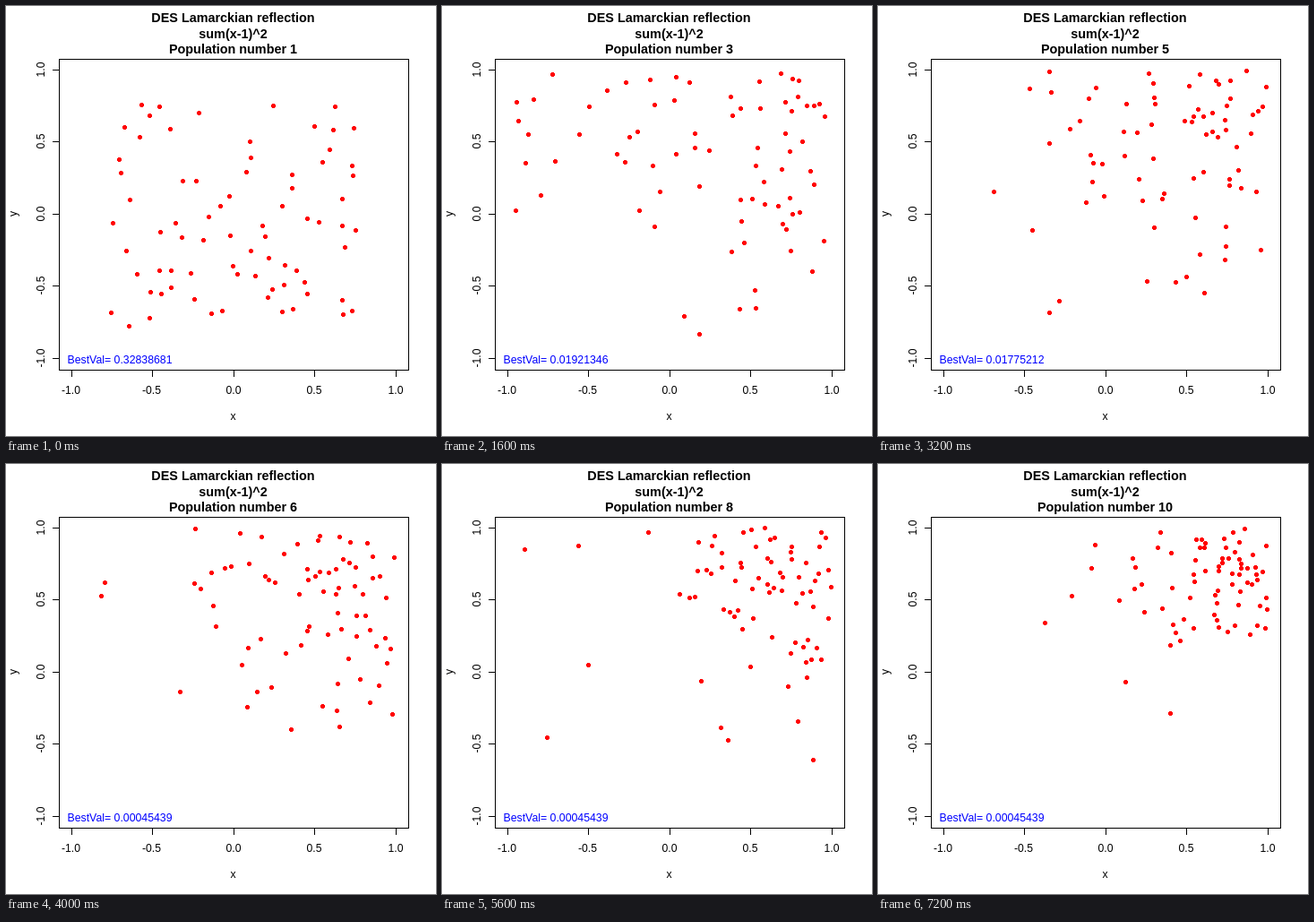
Write an HTML page that moves like this. It is 480x480 px and loops after 8 s.

```html
<!DOCTYPE html>
<html lang="en">
<head>
<meta charset="utf-8">
<title>Population scatter</title>
<style>
html, body { margin: 0; width: 100%; height: 100%; overflow: hidden; background: #fff; }
svg { display: block; width: 100%; height: 100%; font: 12.2px Arial, "Liberation Sans", sans-serif; text-anchor: middle; }
.title { font-size: 14.4px; font-weight: bold; }
.axes { fill: none; stroke: #000; }
.axes, .dots { shape-rendering: crispEdges; }
</style>
</head>
<body>
<svg viewBox="0 0 480 480">
  <rect width="480" height="480" fill="#fff"/>
  <g class="title">
    <text x="253.5" y="18">DES Lamarckian reflection</text>
    <text x="253.5" y="36">sum(x-1)^2</text>
    <text id="heading" x="253.5" y="53"></text>
  </g>
  <path id="axes" class="axes"/>
  <g id="labels"></g>
  <text x="253.5" y="462">x</text>
  <text transform="translate(12 232) rotate(-90)">y</text>
  <g id="dots" class="dots" fill="#f00"></g>
  <text id="best" x="127" y="399" fill="#00f" font-size="12.3"></text>
</svg>
<script>
const STEP = 800, GENERATIONS = 10, COUNT = 75;
const $ = id => document.getElementById(id);
const toX = x => 254 + 181 * x;
const toY = y => 232 - 161 * y;

function add(parent, tag, attrs, text = '') {
  const el = document.createElementNS('http://www.w3.org/2000/svg', tag);
  for (const name in attrs) el.setAttribute(name, attrs[name]);
  el.textContent = text;
  return parent.appendChild(el);
}

function drawAxes() {
  let path = 'M59.5 59.5H449.5V406.5H59.5Z';
  for (let v = -1; v <= 1; v += 0.5) {
    const x = Math.floor(toX(v)), y = Math.floor(toY(v));
    path += `M${x + 0.5} 406V414M52 ${y + 0.5}H60`;
    add($('labels'), 'text', { x: x - (v < 0 ? 0.5 : 0), y: 433 }, v.toFixed(1));
    add($('labels'), 'text', { transform: `translate(43 ${y}) rotate(-90)` }, v.toFixed(1));
  }
  $('axes').setAttribute('d', path);
}

// Best value, from the generation that first reached it
const records = [[1, '0.32838681'], [2, '0.02251061'], [3, '0.01921346'],
  [5, '0.01775212'], [6, '0.00045439']];

function seeded(seed) {
  return () => (seed = (seed * 16807) % 2147483647) / 2147483647;
}

// Starts uniform, then closes in on (1, 1) with a long tail of stragglers
function populate(gen) {
  const rand = seeded(7919 * gen);
  const spread = 1.15 * 0.9 ** gen;
  const gap = gen === 1 ? 10 : 5;

  function coord() {
    if (gen === 1) return 0.78 - 1.56 * rand();
    const away = spread * (-Math.log(rand())) ** 0.8;
    return away < 1.97 ? 1 - away : coord();
  }

  const points = [];
  while (points.length < COUNT) {
    const x = Math.round(toX(coord())), y = Math.round(toY(coord()));
    if (points.every(p => Math.hypot(p[0] - x, p[1] - y) >= gap)) points.push([x, y]);
  }
  return points;
}

drawAxes();
const populations = Array.from({ length: GENERATIONS }, (_, i) => populate(i + 1));
const dots = populations[0].map(() => add($('dots'), 'circle', { r: 2.5 }));
let shown = 0;

function render(time) {
  const gen = Math.floor(time / STEP) % GENERATIONS + 1;
  if (gen === shown) return;
  shown = gen;
  $('heading').textContent = 'Population number ' + gen;
  $('best').textContent = 'BestVal= ' + records.filter(r => r[0] <= gen).pop()[1];
  populations[gen - 1].forEach(([x, y], i) => {
    dots[i].setAttribute('cx', x + 0.5);
    dots[i].setAttribute('cy', y + 0.5);
  });
}

function tick() {
  render(performance.now());
  requestAnimationFrame(tick);
}
tick();
</script>
</body>
</html>
```
